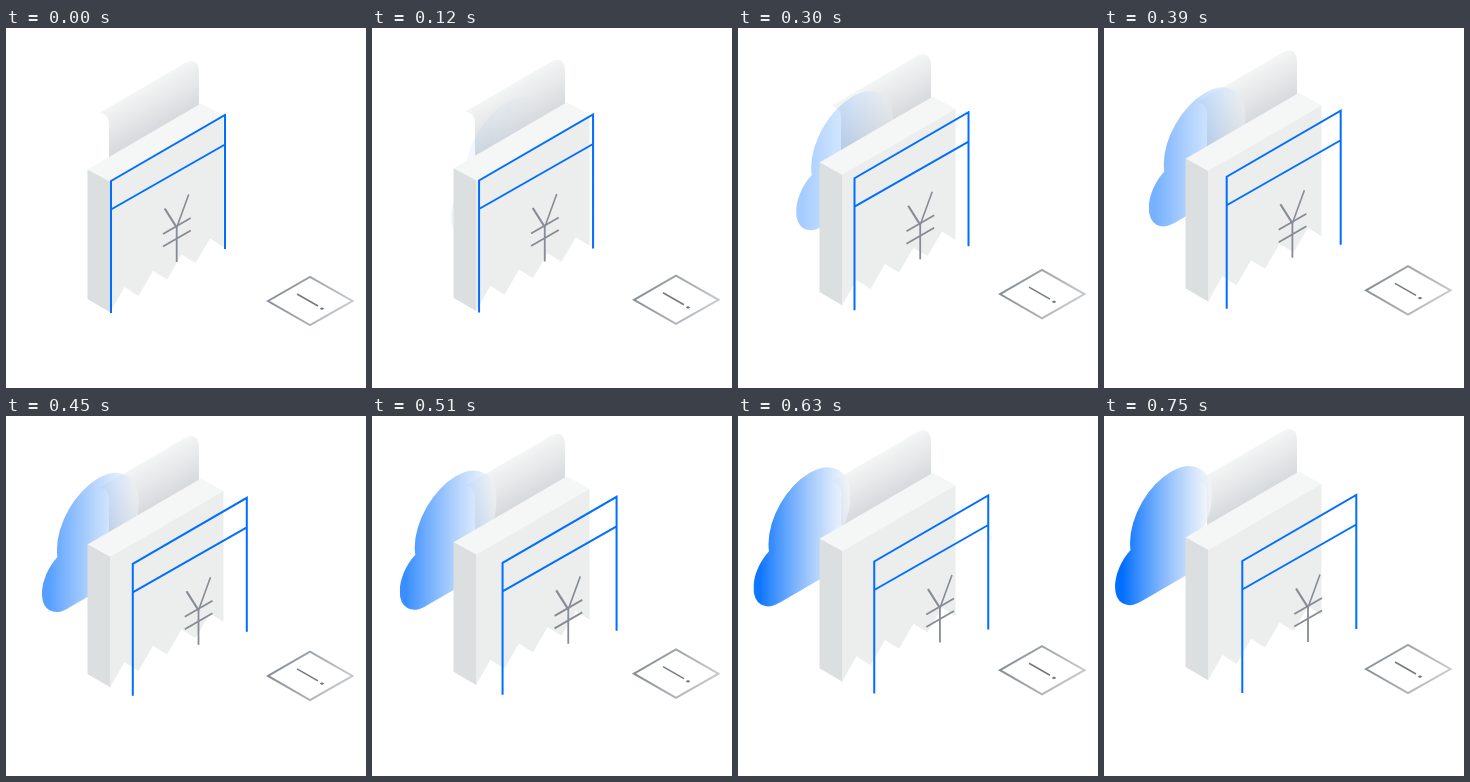
Write an HTML page that moves like this. It is 360 px wide and 360 px high and loops after 1500 ms.

```html
<!DOCTYPE html>
<html lang="en">
<head>
<meta charset="utf-8">
<title>Receipt and cloud</title>
<style>
  html, body { margin: 0; width: 100%; height: 100%; overflow: hidden; background: #fff; }
  svg { display: block; width: 100vw; height: 100vh; }
</style>
</head>
<body>
<svg viewBox="0 0 360 360" fill="none">
  <defs>
    <linearGradient id="sky" gradientUnits="userSpaceOnUse" x1="18" y1="0" x2="106" y2="0">
      <stop offset="0" stop-color="#006eff"/>
      <stop offset="1" stop-color="#f2f5f9" stop-opacity=".7"/>
    </linearGradient>
    <linearGradient id="sheet" gradientUnits="userSpaceOnUse" x1="131" y1="42" x2="159" y2="92">
      <stop offset="0" stop-color="#f4f5f5"/>
      <stop offset="1" stop-color="#ced2d5"/>
    </linearGradient>
    <linearGradient id="steel" gradientUnits="userSpaceOnUse" x1="270" y1="235" x2="336" y2="270">
      <stop offset="0" stop-color="#878d95"/>
      <stop offset="1" stop-color="#c6c9cc"/>
    </linearGradient>
    <clipPath id="puffs">
      <circle r="47.3" transform="matrix(.866 -.5 0 1 67 103)"/>
      <circle r="30" transform="matrix(.866 -.5 0 1 37 155.5)"/>
      <path d="M37 185.5 L100 149 V100 L67 103 L37 155Z"/>
    </clipPath>
  </defs>

  <!-- All parts are placed in their resting pose -->
  <g id="slip">
    <path fill="url(#sheet)" d="M93 65 L180 14.5 Q193 9 193 25 V69 L103 122 V77 Q103 65.500 93 65Z"/>
  </g>
  <g id="cloud">
    <rect x="0" y="40" width="130" height="160" fill="url(#sky)" clip-path="url(#puffs)"/>
  </g>
  <g id="bill">
    <path fill="#f5f7f7" d="M81.500 121.500 L195 55.500 L217.500 68 L104 134Z"/>
    <path fill="#dbdfdf" d="M81.500 121.500 L104.500 134 V264.500 L81.500 251Z"/>
    <path id="front" fill="#eceeee"/>
  </g>
  <g id="outline">
    <path stroke="#006eff" stroke-width="2" d="M138.300 277 V145 L252.300 79 V213 M138.300 173.500 L252.300 108.500"/>
    <g stroke="#868c95">
      <path stroke-width="2.2" d="M192 172.500 L204 191.500"/>
      <path stroke-width="1.6" d="M216 158.500 L204 191.500"/>
      <path stroke-width="1.8" d="M204 191 V226 M190.300 198 L218 182 M190.300 210.500 L218 194.500"/>
    </g>
  </g>
  <g id="badge">
    <path stroke="url(#steel)" stroke-width="2" d="M262 253 L304 228.800 L346.500 253 L304 277.200Z"/>
    <path stroke="#747a82" stroke-width="1.5" d="M291 246 L312 258"/>
    <path fill="#747a82" d="M313.600 260.700 L316 259.300 L318.400 260.700 L316 262.100Z"/>
  </g>
</svg>
<script>
  const LOOP = 1500, RUN = 750, STEP = 30;
  const el = id => document.getElementById(id);

  // Torn lower edge, walked from right to left
  let edge = 'M104 134 L217.5 68 V199';
  for (let i = 3; i >= 0; i--) {
    edge += ` L${118.5 + 28.5 * i} ${239 - 16.2 * i} L${104 + 28.5 * i} ${264.5 - 16.5 * i}`;
  }
  el('front').setAttribute('d', edge + 'Z');

  // Offset of each part at the start of the move
  const parts = [
    ['slip', 0, 20],
    ['cloud', 72, 20],
    ['bill', 0, 20],
    ['outline', -33.3, 8],
    ['badge', 0, 20]
  ].map(([id, x, y]) => ({ node: el(id), x, y }));

  function draw(ms) {
    const t = Math.min(Math.floor(ms / STEP) * STEP / RUN, 1);
    const p = (1 - Math.cos(Math.PI * t)) / 2;
    for (const { node, x, y } of parts) {
      node.setAttribute('transform', `translate(${x * (1 - p)} ${y * (1 - p)})`);
    }
    el('cloud').setAttribute('opacity', p);
  }

  const start = performance.now();
  function tick() {
    draw((performance.now() - start) % LOOP);
    requestAnimationFrame(tick);
  }
  tick();
</script>
</body>
</html>
```
